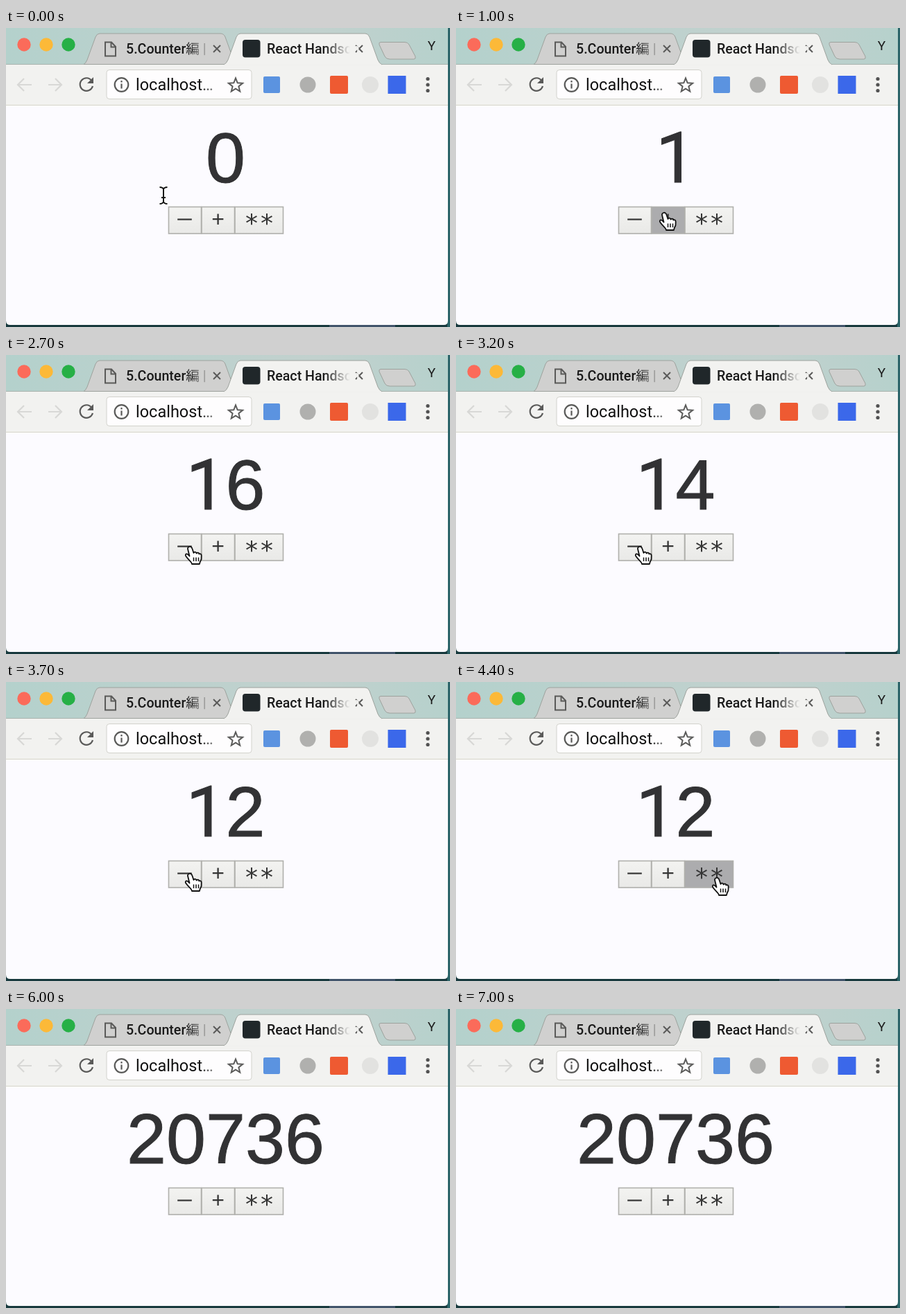
Write an HTML page that moves like this. It is 640x432 px and loops after 7.1 s.

```html
<!DOCTYPE html>
<html lang="ja">
<head>
<meta charset="utf-8">
<title>Counter</title>
<style>
  html, body { margin: 0; width: 100%; height: 100%; overflow: hidden; background: #17393d; }
  svg { display: block; width: 640px; height: 432px; }
  .ui { font-family: Roboto, "Noto Sans CJK JP", "Noto Sans CJK", sans-serif; }
  .tab { font-weight: 500; }
  #count { font: 102.4px "Liberation Sans", Arial, sans-serif; fill: #323234; stroke: #323234; stroke-width: 1; }
  #count .one { font-family: Roboto, sans-serif; }
  .btn rect { fill: url(#face); stroke: #b0b0ac; stroke-width: 1.6; }
  .btn.down rect { fill: #acacae; }
  .btn text { fill: #353535; text-anchor: middle; }
  .icon { fill: none; stroke: #5a5a59; stroke-width: 2.2; }
  .thin { stroke-width: 2; }
  .faint { stroke: #d8d8d6; }
</style>
</head>
<body>
<svg viewBox="0 0 640 432">
  <defs>
    <linearGradient id="strip">
      <stop offset="0" stop-color="#b4d1cc"/>
      <stop offset=".3" stop-color="#bad1cd"/>
      <stop offset=".7" stop-color="#c2d1ce"/>
      <stop offset="1" stop-color="#b6d1cc"/>
    </linearGradient>
    <linearGradient id="face" x2="0" y2="1">
      <stop stop-color="#f3f3f1"/><stop offset="1" stop-color="#e9e9e7"/>
    </linearGradient>
    <linearGradient id="fadeA" gradientUnits="userSpaceOnUse" x1="262" y1="0" x2="296" y2="0">
      <stop stop-color="#1a1a1a"/><stop offset="1" stop-color="#d0d0cf"/>
    </linearGradient>
    <linearGradient id="fadeB" gradientUnits="userSpaceOnUse" x1="458" y1="0" x2="496" y2="0">
      <stop stop-color="#1a1a1a"/><stop offset="1" stop-color="#f2f2f0"/>
    </linearGradient>
    <linearGradient id="fadeUrl" gradientUnits="userSpaceOnUse" x1="278" y1="0" x2="296" y2="0">
      <stop stop-color="#111"/><stop offset="1" stop-color="#777"/>
    </linearGradient>
  </defs>

  <!-- desktop and window -->
  <rect width="640" height="432" fill="#17393d"/>
  <rect x="636" width="4" height="432" fill="#2b6469"/>
  <rect x="466" y="428" width="95" height="4" fill="#41546b"/>
  <path d="M0 0H637V423Q637 429 631 429H6Q0 429 0 423Z" fill="#fcfbff"/>
  <rect width="637" height="53" fill="url(#strip)"/>
  <rect y="52" width="637" height="60" fill="#f2f2f0"/>
  <path d="M0 52.5H637" stroke="#a9b3ad"/>
  <path d="M0 111.5H637" stroke="#d6d6c8"/>

  <circle cx="26" cy="24" r="9.7" fill="#fb6b5a"/>
  <circle cx="58" cy="24" r="9.7" fill="#fcb938"/>
  <circle cx="90" cy="24" r="9.7" fill="#26b046"/>

  <!-- tabs -->
  <g stroke="#9da29d">
    <path d="M112 52.5Q115 51 117 46L129 13Q131 8 135 8H309Q314 8 316 13L328 46Q330 51 334 52.5Z" fill="#d0d0cf"/>
    <path d="M540 20.5H575Q579 20.5 581 24L590 41Q591 45 588 45H553Q548 45 546 41L538 24Q537 20.5 540 20.5Z" fill="#d0d0cf"/>
    <path d="M314 53Q318 51 320 46L332 13Q334 8 338 8H518Q522 8 524 13L536 46Q538 51 542 53" fill="#f2f2f0"/>
  </g>
  <path d="M315 53.5H541" stroke="#f2f2f0" stroke-width="2"/>
  <path class="icon thin" d="M143 20.5H152L158 27V40.5H143ZM151.5 20.5V27.5H158"/>
  <path class="icon thin" d="M299 25L309 35M309 25L299 35M504 25L514 35M514 25L504 35"/>
  <rect x="341" y="17" width="25.5" height="25.5" rx="4" fill="#20272a"/>
  <g class="ui tab" font-size="19.6">
    <text x="173" y="37" fill="url(#fadeA)">5.Counter編 |</text>
    <text x="376" y="37" fill="url(#fadeB)">React Handson</text>
  </g>
  <text class="ui" x="613.5" y="32" font-size="19" text-anchor="middle" fill="#1a1a1a">Y</text>

  <!-- toolbar -->
  <path class="icon faint" d="M37 82H18M26 73L17 82L26 91M61 82H80M71 73L80 82L71 91"/>
  <path class="icon" d="M123.5 76A9.3 9.3 0 1 0 125 84"/>
  <path d="M126 71V80H117Z" fill="#5a5a59"/>
  <rect x="145" y="60.5" width="209" height="42" rx="4" fill="#fefdfe" stroke="#d2d2cc"/>
  <circle class="icon" cx="166.5" cy="82" r="9.8"/>
  <path class="icon" d="M166.5 80.5V87.5M166.5 76V78.6"/>
  <text class="ui" x="187" y="90" font-size="23.5" fill="url(#fadeUrl)">localhost…</text>
  <path id="star" class="icon thin"/>
  <rect x="371" y="70" width="24" height="24" rx="2" fill="#5b93e0"/>
  <circle cx="435" cy="82" r="11.5" fill="#b0b0ae"/>
  <rect x="467" y="69" width="26" height="26" rx="2" fill="#ee5a32"/>
  <circle cx="525" cy="82" r="12" fill="#e2e2e0"/>
  <rect x="550.5" y="69" width="26" height="26" fill="#3b68ea"/>
  <g fill="#525252">
    <circle cx="608" cy="73.5" r="2.6"/><circle cx="608" cy="82" r="2.6"/><circle cx="608" cy="90.5" r="2.6"/>
  </g>

  <!-- counter -->
  <text id="count" y="222.5"></text>
  <g class="btn"><rect x="234.5" y="258.5" width="47" height="38.5"/>
    <text x="257.5" y="281.5" font-family="Liberation Sans, sans-serif" font-size="20" stroke="#353535" stroke-width=".6">—</text></g>
  <g class="btn"><rect x="282" y="258.5" width="47.5" height="38.5"/>
    <text x="305.5" y="287.3" font-family="Liberation Sans, sans-serif" font-size="32">+</text></g>
  <g class="btn"><rect x="330" y="258.5" width="69.5" height="38.5"/>
    <text x="354 376" y="294" font-family="DejaVu Sans, sans-serif" font-size="36">**</text></g>

  <!-- pointers -->
  <g id="beam" fill="none">
    <path d="M-5.5 -12Q-1 -12 0 -9Q1 -12 5.5 -12M0 -9V9M-5.5 12Q-1 12 0 9Q1 12 5.5 12M-3 3H3" stroke="#fff" stroke-width="4"/>
    <path d="M-5.5 -12Q-1 -12 0 -9Q1 -12 5.5 -12M0 -9V9M-5.5 12Q-1 12 0 9Q1 12 5.5 12M-3 3H3" stroke="#111" stroke-width="2"/>
  </g>
  <g id="hand" stroke="#111" stroke-linejoin="round">
    <path d="M1 0C3 -1 5 1 5.5 3L7.5 9C8 7 11 7 11.5 9.5C13 8 15 8.5 15.3 10.5C17 9.5 18.7 10.5 18.7 13L18.5 18C18 20 16.5 21 16 25H5C5 22 0 19 -3.5 14C-5 12 -4 10 -2 10.5C-.5 11 .5 12.5 1.5 13.5L-.8 4C-1.5 2 -.5 .5 1 0Z" fill="#fff" stroke-width="1.8"/>
    <path d="M7.5 15.5V21M11 15.5V21M14.5 15.5V21" stroke-width="1.5"/>
  </g>
</svg>
<script>
const LOOP = 7100, STEP = 100, HOLD = 100;
const MINUS = 0, PLUS = 1, POWER = 2;

// pointer stops: time, x, y
const path = [
  [0, 227, 242], [200, 227, 242], [600, 298, 267], [1300, 298, 267],
  [1700, 355, 270], [2400, 355, 270], [2700, 263, 277], [3800, 263, 277],
  [4200, 374, 283], [5500, 374, 283], [6000, 430, 450], [LOOP, 430, 450]
];

// press time, button, value after release
const clicks = [
  [700, PLUS, 1], [1000, PLUS, 2], [1800, POWER, 4], [2100, POWER, 16],
  [2800, MINUS, 15], [3000, MINUS, 14], [3300, MINUS, 13], [3600, MINUS, 12],
  [4400, POWER, 144], [4800, POWER, 20736]
];

const $ = id => document.getElementById(id);
const buttons = document.querySelectorAll('.btn');
const ease = u => u * u * (3 - 2 * u);

function pointerAt(t) {
  const i = path.findIndex((p, k) => k && t <= p[0]);
  const [t0, x0, y0] = path[i - 1], [t1, x1, y1] = path[i];
  const u = ease((t - t0) / (t1 - t0));
  return [x0 + (x1 - x0) * u, y0 + (y1 - y0) * u];
}

function showCount(n) {
  const digits = [...String(n)], w = 57;
  const left = 316.5 - digits.length * w / 2;
  $('count').innerHTML = digits.map((d, i) =>
    `<tspan x="${left + i * w}"${d === '1' ? ' class="one"' : ''}>${d}</tspan>`).join('');
}

function draw(t) {
  let value = 0, held = -1;
  for (const [at, button, result] of clicks) {
    if (t >= at + HOLD) value = result;
    else if (t >= at) held = button;
  }
  showCount(value);
  buttons.forEach((b, i) => b.classList.toggle('down', i === held));

  const [x, y] = pointerAt(t);
  const over = x > 234 && x < 400 && y > 258 && y < 297;
  for (const id of ['hand', 'beam']) {
    $(id).setAttribute('transform', `translate(${x} ${y})`);
    $(id).style.display = (id === 'hand') === over ? '' : 'none';
  }
}

$('star').setAttribute('d', 'M' + Array.from({ length: 10 }, (_, i) => {
  const r = i % 2 ? 4.6 : 10.6, a = Math.PI * (i / 5 - 0.5);
  return `${331 + r * Math.cos(a)} ${83 + r * Math.sin(a)}`;
}).join('L') + 'Z');

let start, last = -1;
function tick(now) {
  start ??= now;
  const t = Math.floor(((now - start) % LOOP) / STEP) * STEP;
  if (t !== last) draw(last = t);
  requestAnimationFrame(tick);
}
draw(0);
requestAnimationFrame(tick);
</script>
</body>
</html>
```
